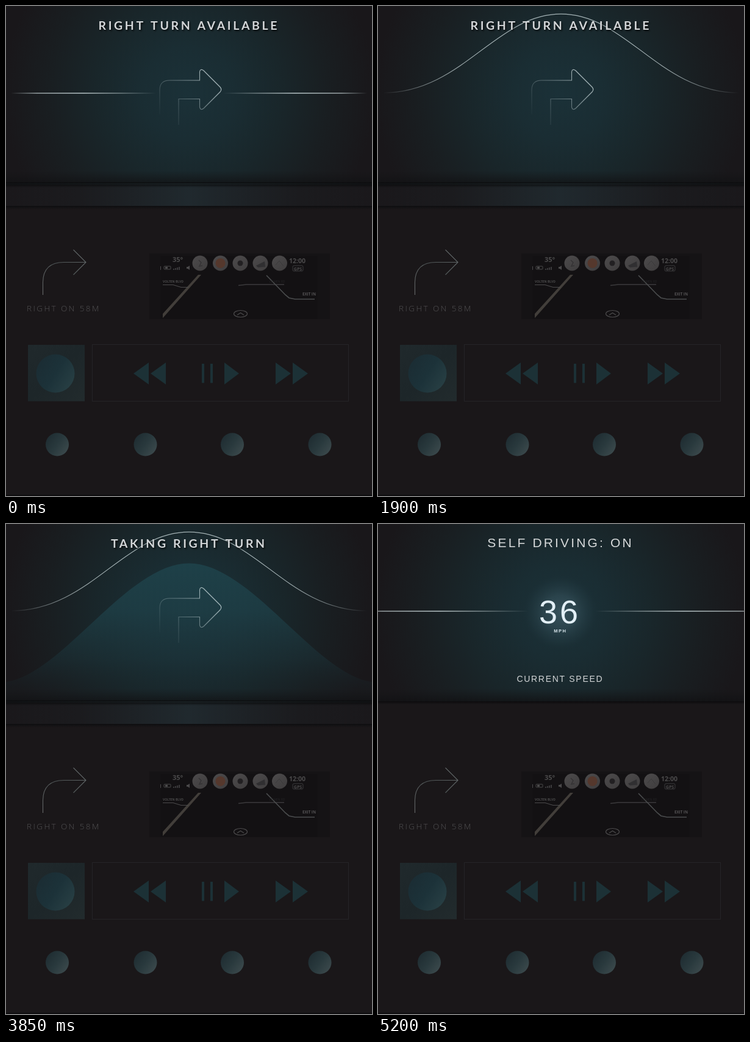
An HTML page with a canvas for the animation above (5.25 s loop, 600 by 804 pixels).

```html
<!DOCTYPE html>
<html lang="en">
<head>
<meta charset="utf-8">
<title>Self driving dashboard</title>
<style>
html, body { margin: 0; width: 600px; height: 804px; overflow: hidden; background: #1a1719; }
canvas { display: block; }
</style>
</head>
<body>
<canvas id="stage" width="600" height="804"></canvas>
<script>
const ctx = document.getElementById('stage').getContext('2d');
const LOOP = 5250, STEP = 50, BASE = '#1a1719';
const GEO = 'Lato, "Open Sans", sans-serif';
const ARIAL = '"Liberation Sans", Arial, sans-serif';
const OPEN = '"Open Sans", sans-serif';

const clamp = v => Math.max(0, Math.min(1, v));
const span = (t, a, b) => clamp((t - a) / (b - a));
const mix = (a, b, p) => a + (b - a) * p;
const smooth = p => p * p * (3 - 2 * p);
const white = a => `rgba(222,236,238,${a})`;

function stops(g, list) {
  list.forEach(([p, c]) => g.addColorStop(p, c));
  return g;
}
const linear = (x0, y0, x1, y1, ...list) => stops(ctx.createLinearGradient(x0, y0, x1, y1), list);
const radial = (x, y, r, ...list) => stops(ctx.createRadialGradient(x, y, 0, x, y, r), list);

function rect(x, y, w, h, fill) {
  ctx.fillStyle = fill;
  ctx.fillRect(x, y, w, h);
}
function disc(x, y, r, fill) {
  ctx.fillStyle = fill;
  ctx.beginPath();
  ctx.arc(x, y, r, 0, 7);
  ctx.fill();
}
function poly(points, close) {
  ctx.beginPath();
  points.forEach(([x, y]) => ctx.lineTo(x, y));
  if (close) ctx.closePath();
}
function stroke(style, width) {
  ctx.strokeStyle = style;
  ctx.lineWidth = width;
  ctx.stroke();
}
function text(str, x, y, font, spacing, fill, align = 'left') {
  ctx.font = font;
  ctx.letterSpacing = spacing + 'px';
  ctx.textAlign = align;
  ctx.fillStyle = fill;
  ctx.fillText(str, align === 'center' ? x + spacing / 2 : x, y);
}
function layer(alpha, draw) {
  if (alpha <= 0) return;
  ctx.save();
  ctx.globalAlpha = alpha;
  draw();
  ctx.restore();
}

function backdrop() {
  rect(0, 0, 600, 804, BASE);
  rect(0, 0, 600, 291, radial(300, 143, 305,
    [0, '#1b3138'], [0.25, '#1a2d33'], [0.5, '#19262a'], [0.75, '#191e21'], [1, '#19171a']));
  rect(0, 270, 600, 21, linear(0, 270, 0, 291, [0, 'rgba(20,20,22,0)'], [1, 'rgba(16,17,19,.75)']));
  rect(0, 291, 600, 5, linear(0, 291, 0, 296, [0, '#0c0b0d'], [1, BASE]));
  rect(0, 802, 600, 2, '#0e0d0f');
}

function band() {
  rect(0, 291, 600, 38, linear(0, 0, 600, 0,
    [0, '#1a181b'], [0.2, '#1b1b1e'], [0.5, '#20292e'], [0.8, '#1b1b1e'], [1, '#1a181b']));
  rect(0, 289, 600, 9, linear(0, 289, 0, 298,
    [0, 'rgba(8,9,10,.3)'], [0.35, 'rgba(8,9,10,.8)'], [1, 'rgba(8,9,10,0)']));
  rect(0, 328, 600, 6, linear(0, 328, 0, 334, [0, '#0d0d0f'], [0.4, '#131214'], [1, BASE]));
}

function directions() {
  ctx.beginPath();
  ctx.moveTo(60.5, 474);
  ctx.lineTo(60.5, 453);
  ctx.quadraticCurveTo(61, 420.5, 95, 420.5);
  ctx.lineTo(131, 420.5);
  ctx.moveTo(110.5, 400);
  ctx.lineTo(131, 420.5);
  ctx.lineTo(110.5, 441);
  stroke(linear(60, 474, 131, 410, [0, '#67696a'], [0.5, '#4c5253'], [1, '#626869']), 1.1);
  text('RIGHT ON 58M', 34, 501, '300 13.5px ' + OPEN, 2.4, '#525153');
}

function preview() {
  rect(235, 406, 296, 108, '#151315');
  rect(253, 410, 258, 103, '#131113');
  const grey = '#4b4a4b', faint = '#3b3a3c';
  text('35°', 273, 420, '700 11px ' + OPEN, 0, grey);
  text('12:00', 464, 422, '700 10.5px ' + OPEN, 0, grey);
  ctx.beginPath();
  ctx.roundRect(470, 426, 17, 9, 2);
  stroke(faint, 1);
  text('GPS', 478.5, 433.5, '700 7px ' + OPEN, 0, grey, 'center');
  rect(253, 427, 1, 6, grey);
  ctx.beginPath();
  ctx.roundRect(259, 427, 11, 5, 1);
  stroke(grey, 1);
  rect(261, 428, 4, 3, grey);
  for (let i = 0; i < 4; i++) rect(274 + i * 3, 431 - i, 2, i + 2, faint);
  poly([[296, 428], [298, 428], [301, 426], [301, 433], [298, 431], [296, 431]], true);
  ctx.fillStyle = grey;
  ctx.fill();

  [318, 351.5, 384, 417, 448.5].forEach((x, i) => {
    disc(x, 422, 12.5, linear(x - 9, 412, x + 9, 433, [0, '#4b494a'], [1, '#403e3f']));
    if (i === 1) disc(x, 422, 8, '#55382d');
    if (i === 2) disc(x, 422, 4.5, '#222022');
  });
  poly([[316, 417], [320, 421], [317, 427], [322, 426]]);
  stroke('#353335', 1.5);
  poly([[410, 426], [424, 419], [425, 428], [413, 429]], true);
  ctx.fillStyle = '#302f31';
  ctx.fill();
  poly([[442, 425], [448, 418], [455, 427]]);
  stroke('#3a393a', 1);

  poly([[257, 505], [315, 441], [320, 441], [257, 512]], true);
  ctx.fillStyle = '#423e3a';
  ctx.fill();
  poly([[257, 457.5], [274, 457.5], [287, 461.5], [299, 461.5]]);
  stroke(grey, 1.2);
  poly([[381, 458.5], [394, 457], [456, 457]]);
  stroke(faint, 1.3);
  poly([[427, 442], [458, 474], [464, 479], [474, 481], [506, 481]]);
  stroke('#4a4c4d', 1.7);
  text('VOLTEN BLVD', 257, 453.5, '700 5px ' + OPEN, 0, grey);
  text('EXIT IN', 486, 475, '700 6.2px ' + OPEN, 0, '#555355');
  text('LOMEN RD', 432, 454, '5px ' + OPEN, 0, '#252426');
  ctx.beginPath();
  ctx.ellipse(384.5, 505, 11, 5.5, 0, 0, 7);
  stroke(grey, 1.2);
  poly([[379, 507], [384.5, 503.5], [390, 507]]);
  stroke(grey, 1.3);
}

function player() {
  rect(36, 556, 93, 92.5, linear(36, 556, 129, 648, [0, '#20292c'], [0.5, '#1d2629'], [1, '#222b2d']));
  disc(81, 603, 31.5, linear(55, 585, 108, 620, [0, '#1b2d34'], [0.5, '#1c3239'], [1, '#273e43']));
  ctx.strokeStyle = '#252427';
  ctx.lineWidth = 1;
  ctx.strokeRect(141.5, 555.5, 420, 93);
  const teal = '#1c3136';
  const triangle = (x, w) => {
    poly([[x, 585], [x + w, 603], [x, 621]], true);
    ctx.fillStyle = teal;
    ctx.fill();
  };
  triangle(234, -25);
  triangle(262, -25);
  triangle(358, 24);
  triangle(442, 25);
  triangle(470, 25);
  rect(321, 587, 4, 31.5, teal);
  rect(335, 587, 4, 31.5, teal);
  for (const x of [84, 228.5, 371, 514.5])
    disc(x, 719.5, 19, linear(x - 15, 709, x + 14, 731, [0, '#202e33'], [0.5, '#29393d'], [1, '#39474a']));
}

function sideLines(left, right) {
  const fade = (from, to) => linear(from, 0, to, 0,
    [0, white(0)], [0.18, white(0.6)], [0.5, white(0.75)], [0.75, white(0.42)], [1, white(0)]);
  rect(left, 142.3, 246 - left, 1.6, fade(left, 246));
  rect(356, 142.3, right - 356, 1.6, fade(right, 356));
}

function hill(x0, yEnd, peak, foot, crown) {
  ctx.beginPath();
  ctx.moveTo(x0, yEnd);
  ctx.bezierCurveTo(x0 + foot, yEnd, 300 - crown, peak, 300, peak);
  ctx.bezierCurveTo(300 + crown, peak, 600 - x0 - foot, yEnd, 600 - x0, yEnd);
}

function wave(peak) {
  if (peak >= 143) return sideLines(8, 592);
  hill(8, 142.5, peak, 130, 107);
  stroke(linear(8, 0, 592, 0, [0, white(0)], [0.12, white(0.45)], [0.25, white(0.72)],
    [0.5, white(0.7)], [0.75, white(0.72)], [0.88, white(0.45)], [1, white(0)]), 1.2);
}

function swell(p) {
  if (p <= 0) return;
  const peak = mix(290, 64.5, p);
  hill(-10, mix(290, 260, p), peak, 95, 105);
  ctx.lineTo(610, 290);
  ctx.lineTo(-10, 290);
  ctx.closePath();
  ctx.fillStyle = linear(0, peak, 0, 290, [0, 'rgba(30,65,73,.95)'], [0.35, 'rgba(30,63,71,.78)'],
    [0.7, 'rgba(28,54,61,.42)'], [1, 'rgba(22,36,40,.06)']);
  ctx.fill();
}

function turnArrow() {
  ctx.beginPath();
  ctx.moveTo(252, 178);
  ctx.lineTo(252, 138);
  ctx.quadraticCurveTo(252, 122, 268, 122);
  ctx.lineTo(317.5, 122);
  ctx.lineTo(317.5, 108);
  ctx.quadraticCurveTo(318.5, 102, 324, 106);
  ctx.lineTo(351, 133);
  ctx.quadraticCurveTo(354.5, 137, 351, 141);
  ctx.lineTo(324, 168);
  ctx.quadraticCurveTo(319, 172, 317.5, 166);
  ctx.lineTo(317.5, 152.5);
  ctx.lineTo(283, 152.5);
  ctx.lineTo(283, 195);
  stroke(linear(262, 196, 343, 128, [0, white(0)], [0.3, white(0.17)], [0.6, white(0.38)], [1, white(0.72)]), 1.15);
}

function heading(str, alpha) {
  layer(alpha, () => {
    ctx.shadowColor = 'rgba(0,0,0,.75)';
    ctx.shadowBlur = 3;
    ctx.shadowOffsetX = 1.5;
    ctx.shadowOffsetY = 1.5;
    text(str, 298, 39, '700 19.5px ' + GEO, 3.6, '#d3d6d8', 'center');
  });
}

function speed() {
  rect(220, 63, 160, 160, radial(299, 145, 62,
    [0, 'rgba(80,112,124,.52)'], [0.45, 'rgba(64,94,105,.42)'], [0.8, 'rgba(42,68,77,.2)'], [1, 'rgba(30,50,58,0)']));
  sideLines(-45, 645);
  text('SELF DRIVING: ON', 297.5, 38, '21px ' + ARIAL, 3.15, '#d6d9da', 'center');
  text('36', 296, 163, '54px ' + ARIAL, 4, '#e2eff6', 'center');
  text('MPH', 298, 177.5, '700 7.5px ' + ARIAL, 1.5, '#d5e2e8', 'center');
  text('CURRENT SPEED', 297.5, 259, '14px ' + ARIAL, 1.7, '#d3d6d7', 'center');
}

function peakAt(t) {
  if (t < 450) return 143;
  if (t < 1325) return mix(78, 52.5, 1 - (1 - span(t, 750, 1250)) ** 2);
  return mix(52.5, 13.2, smooth(span(t, 1300, 1850)));
}

function draw(t) {
  const out = 1 - span(t, 3900, 4400);
  const enter = span(t, 4750, 5200);
  const swap = span(t, 2000, 2300);
  const rise = span(t, 2450, 3500);
  backdrop();
  layer(1 - enter, band);
  layer(out, () => {
    swell((rise + smooth(rise)) / 2);
    rect(0, 291.5, 600, 1, linear(0, 0, 600, 0,
      [0, 'rgba(50,66,72,.2)'], [0.5, 'rgba(50,66,72,.6)'], [1, 'rgba(50,66,72,.2)']));
    wave(peakAt(t));
    turnArrow();
  });
  heading('RIGHT TURN AVAILABLE', out * (1 - swap));
  heading('TAKING RIGHT TURN', out * swap);
  directions();
  preview();
  player();
  layer(enter, speed);
}

const start = performance.now();
function tick() {
  const t = (performance.now() - start) % LOOP;
  draw(Math.floor(t / STEP) * STEP);
  requestAnimationFrame(tick);
}
tick();
</script>
</body>
</html>
```
